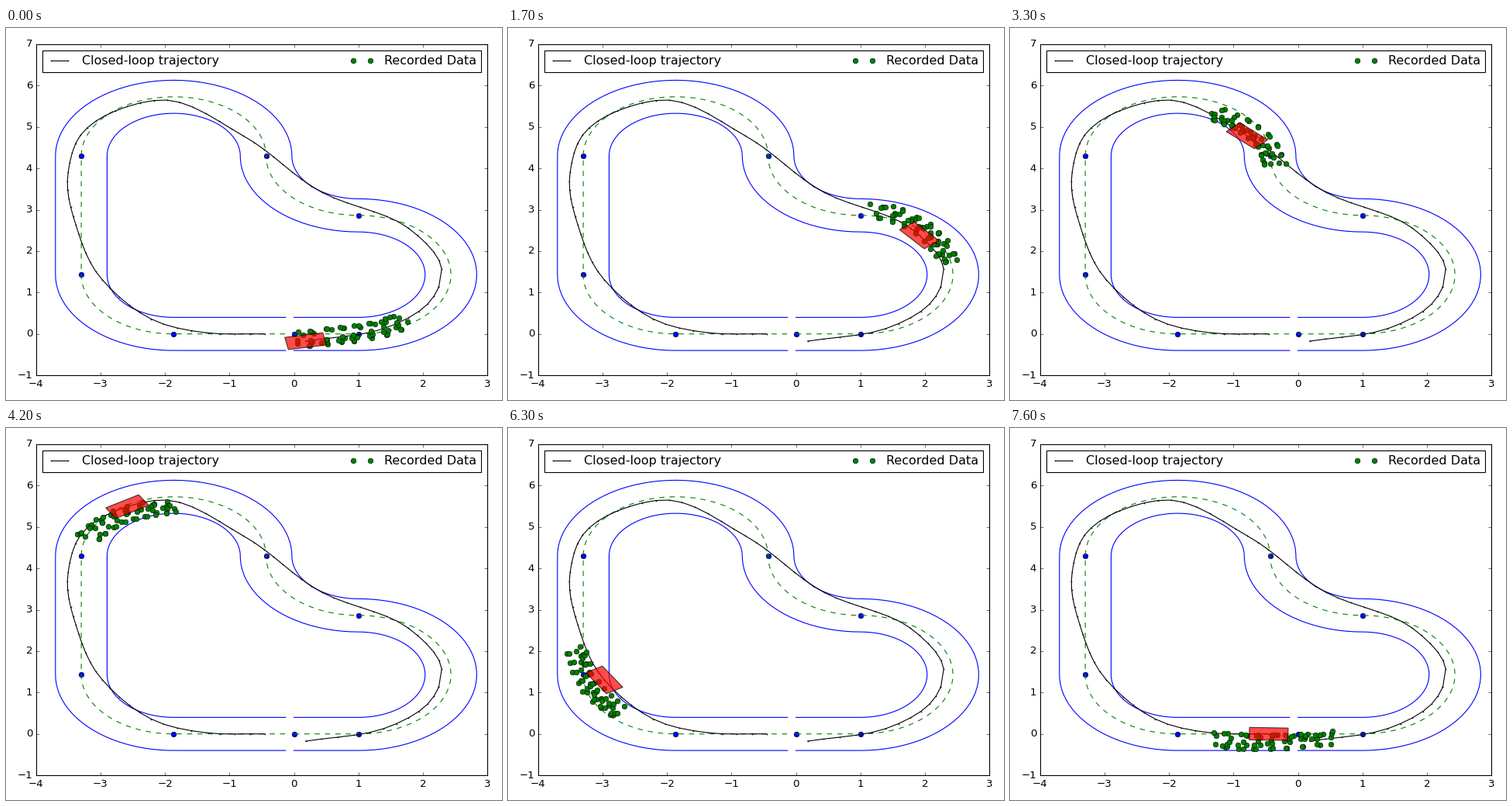
Write a matplotlib script that moves like this. It is 640 px wide and 480 px high and loops after 7700 ms.

```python
import numpy as np
import matplotlib.pyplot as plt
from matplotlib.animation import FuncAnimation
from matplotlib.patches import Polygon

plt.style.use("classic")
plt.rcParams.update({"font.family": "DejaVu Sans", "savefig.dpi": "figure"})

FRAMES, INTERVAL = 77, 100
LAST = FRAMES - 1

# Track: (length, curvature) of each segment
R = 4.5 / np.pi
SEGMENTS = [(1, 0), (4.5, 1 / R), (2.25, -1 / R), (4.5, 1 / R),
            (2 * R, 0), (2.25, 1 / R), (2 * R - 1, 0)]
LENGTH = sum(length for length, _ in SEGMENTS)
HALF_WIDTH = 0.4

# Driven line: step, x, y
KEYS = np.array([
    (0, .18, -.175), (5, 1.385, .125), (9, 2.07, .72), (13, 2.29, 1.57),
    (18, 1.77, 2.56), (25, .435, 3.42), (33, -.79, 4.79), (39, -1.97, 5.65),
    (43, -2.765, 5.39), (47, -3.305, 4.81), (51, -3.5, 3.91),
    (57, -3.38, 2.63), (63, -2.97, 1.305), (69, -2.02, .235),
    (72, -1.37, .03), (LAST, -.455, 0)])

# Earlier laps swing between wide entries and apexes: arc length, offset
SWING = np.array([(18.5 - LENGTH, -.19), (2.2, .15), (6.4, -.22), (9.4, .28),
                  (13.7, -.16), (16.2, .15), (18.5, -.19), (LENGTH + 2.2, .15)])
LAPS, SPREAD, SPACING = 8, 0.18, 0.235
BEHIND, WINDOW = 0.85, 1.85

BODY = np.array([(0.3, 0.15), (0.3, -0.15), (-0.3, -0.15), (-0.3, 0.15)])


def track(s, offset=0.0):
    """Position at arc length s, shifted to the left by offset."""
    s = np.asarray(s, float) % LENGTH
    x, y, h = np.zeros((3,) + s.shape)
    start = 0
    for length, k in SEGMENTS:
        d = np.clip(s - start, 0, length)
        if k:
            x = x + (np.sin(h + k * d) - np.sin(h)) / k
            y = y - (np.cos(h + k * d) - np.cos(h)) / k
        else:
            x, y = x + d * np.cos(h), y + d * np.sin(h)
        h = h + k * d
        start += length
    return x - offset * np.sin(h), y + offset * np.cos(h)


def drive(t):
    """Cubic Hermite curve through the keys."""
    keys = KEYS[:, 0]
    points = KEYS[:, 1:]
    slopes = np.gradient(points, keys, axis=0)
    i = np.clip(np.searchsorted(keys, t, "right") - 1, 0, len(keys) - 2)
    span = (keys[i + 1] - keys[i])[:, None]
    u = (t - keys[i])[:, None] / span
    ease = u * u * (3 - 2 * u)
    return (points[i] * (1 - ease) + points[i + 1] * ease
            + span * u * (1 - u) * (slopes[i] * (1 - u) - slopes[i + 1] * u))


def swing(s):
    """Cosine easing between the swing extremes."""
    i = np.searchsorted(SWING[:, 0], s, "right") - 1
    (s0, e0), (s1, e1) = SWING[i].T, SWING[i + 1].T
    return e0 + (e1 - e0) * (1 - np.cos(np.pi * (s - s0) / (s1 - s0))) / 2


# The car stalls for one step, and its nose points one step ahead
steps = np.arange(FRAMES, dtype=float)
steps[12] = steps[11]
path = drive(steps)
ahead = np.minimum(steps + 1, LAST)
nose = drive(ahead) - drive(ahead - 0.2)
heading = np.arctan2(nose[:, 1], nose[:, 0])

# Progress of the car along the centre line
grid = np.arange(0, LENGTH, 0.01)
centre = np.transpose(track(grid))
progress = [grid[np.argmin(((centre - p) ** 2).sum(axis=1))] for p in path]

rng = np.random.default_rng(4)
laps = []
for side in np.linspace(-1, 1, LAPS):
    s = np.arange(0.03, LENGTH + 1, SPACING) + rng.uniform(0, SPACING)
    s = s + rng.normal(0, 0.02, s.size)
    drift = side + 0.35 * np.sin(1.1 * s + rng.uniform(0, 6))
    drift = np.clip(drift + rng.normal(0, 0.12, s.size), -1, 1)
    laps.append((s, swing(s) + SPREAD * drift))
data_s, data_e = np.hstack(laps)
data_x, data_y = track(data_s, data_e)

fig, ax = plt.subplots(figsize=(8, 6), dpi=80, facecolor="white")
ends = np.cumsum([0] + [length for length, _ in SEGMENTS[:-1]])
ax.plot(*track(ends), "bo")
s = np.arange(int(10 * LENGTH)) * 0.1
ax.plot(*track(s), "g--")
for side in (HALF_WIDTH, -HALF_WIDTH):
    ax.plot(*track(s, side), "b-")
ax.plot(*path.T, "k.-", ms=2, label="Closed-loop trajectory")
dots, = ax.plot([], [], "go", label="Recorded Data")
car = ax.add_patch(Polygon(BODY, closed=True, fc="r", ec="k", alpha=0.7,
                           zorder=10))
ax.set_xlim(-4, 3)
ax.set_ylim(-1, 7)
fig.tight_layout()
ax.legend(loc="upper center", mode="expand", ncol=2)


def update(i):
    c, n = np.cos(heading[i]), np.sin(heading[i])
    car.set_xy(BODY @ np.array([(c, n), (-n, c)]) + path[i])
    first = max(progress[i] - BEHIND, 0)
    near = (data_s >= first) & (data_s <= first + WINDOW)
    dots.set_data(data_x[near], data_y[near])
    return dots, car


anim = FuncAnimation(fig, update, frames=FRAMES, interval=INTERVAL,
                     repeat=True, repeat_delay=0, blit=False)
plt.show()
```
